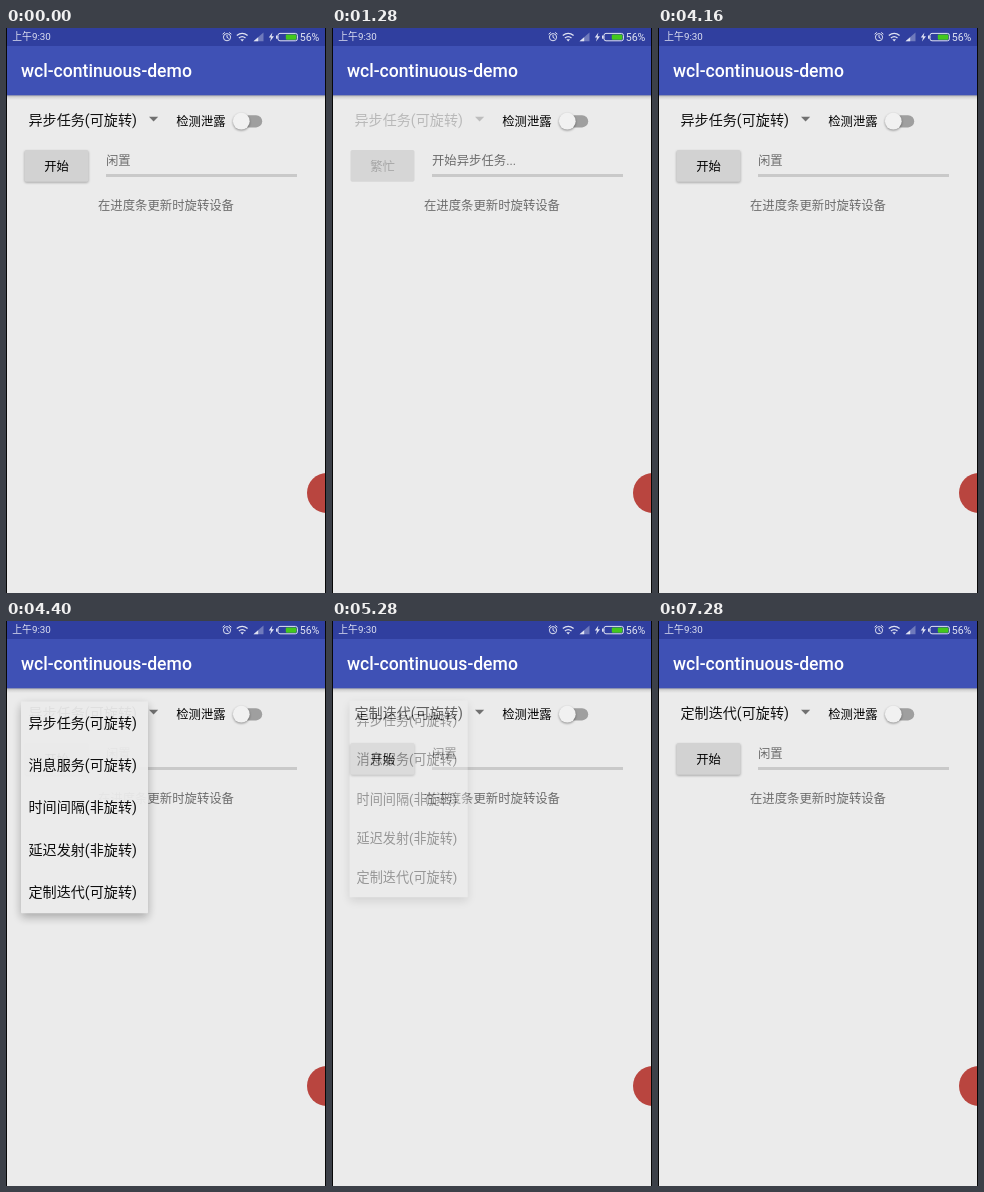
Animation, 320 px wide and 565 px high, one loop 7680 ms. Source, as an HTML page:

```html
<!DOCTYPE html>
<html lang="zh-CN">
<head>
<meta charset="utf-8">
<title>Task demo</title>
<style>
  html, body { margin: 0; width: 100%; height: 100%; overflow: hidden; background: #ebebeb; }
  svg { display: block; width: 320px; height: 565px; }
  text {
    font: 12.37px Roboto, "Noto Sans CJK SC", "Noto Sans CJK", "Noto Sans CJK JP", sans-serif;
    fill: #000;
    white-space: pre;
  }
  .big { font-size: 14.1px; }
  .title { font-size: 17.6px; font-weight: 500; fill: #fff; }
  .clock { font-size: 9.8px; fill: #dfe2f2; }
  .level { font-size: 10.6px; fill: #dfe2f2; }
  .soft { fill: #6c6c6c; }
  .mid { text-anchor: middle; }
  .line { fill: none; stroke: #dfe2f2; }
  #spinner { fill: #111; }
  #arrow { fill: #707070; }
  .busy #spinner { fill: #b9b9b9; }
  .busy #arrow { fill: #bdbdbd; }
  .busy #label { fill: #a6a6a6; }
  .busy #button { fill: #d6d6d6; filter: none; }
  #button { fill: #d2d2d2; filter: drop-shadow(0 1px 1px rgba(0, 0, 0, .3)); }
  #panel { fill: #ececec; filter: drop-shadow(0 4px 5px rgba(0, 0, 0, .3)); }
  #thumb { fill: #f1f1f1; filter: drop-shadow(0 1px 1px rgba(0, 0, 0, .4)); }
  #popup { transform-origin: 52px 66px; }
</style>
</head>
<body>
<svg id="stage" viewBox="0 0 320 565">
  <defs>
    <linearGradient id="shade" x2="0" y2="1">
      <stop stop-color="#000" stop-opacity=".3"/>
      <stop offset=".4" stop-color="#000" stop-opacity=".1"/>
      <stop offset="1" stop-color="#000" stop-opacity="0"/>
    </linearGradient>
    <clipPath id="buttonClip"><rect x="18.5" y="122" width="64" height="31.8" rx="1.8"/></clipPath>
    <clipPath id="rowClip"><rect x="15" y="250" width="127" height="42"/></clipPath>
  </defs>

  <rect width="320" height="565" fill="#ebebeb"/>
  <rect y="67" width="320" height="5" fill="url(#shade)"/>
  <rect y="18" width="320" height="49.3" fill="#3f51b5"/>
  <rect width="320" height="18" fill="#303f9f"/>
  <text class="title" x="15" y="49.3">wcl-continuous-demo</text>

  <!-- status bar -->
  <text class="clock" x="6.3" y="12.4">上午9:30</text>
  <g class="line">
    <circle cx="221" cy="9.2" r="3.6"/>
    <path d="M221 7v2.4l1.7 1M216.6 6.2l2.2-1.8M225.4 6.2l-2.2-1.8"/>
    <path stroke-width="1.3" d="M230.8 7.6q5.4-4.6 10.8 0M232.9 10q3.3-2.8 6.6 0"/>
  </g>
  <path d="M234.3 11.2h3.8l-1.9 2.3z" fill="#dfe2f2"/>
  <path d="M257.5 4.5v8.8h-10z" fill="#6f7abc"/>
  <path d="M252.2 9.2v4.1h-4.7z" fill="#dfe2f2"/>
  <path d="M266.4 4.6l-3.6 5h2.2l-1 3.8 4-5.2h-2.4z" fill="#dfe2f2"/>
  <rect class="line" x="272" y="5.4" width="19.4" height="7.4" rx="2"/>
  <rect x="270" y="7.5" width="1.6" height="3.2" fill="#dfe2f2"/>
  <rect x="279.8" y="6.4" width="10.6" height="5.4" rx="1" fill="#43c81c"/>
  <text class="level" x="293.7" y="12.8">56%</text>

  <!-- page -->
  <text id="spinner" class="big" x="22.5" y="96.7"></text>
  <path id="arrow" d="M143 88.8h9.2l-4.6 4.8z"/>
  <text x="170.2" y="98">检测泄露</text>
  <rect x="233" y="87.2" width="23.2" height="12.2" rx="6.1" fill="#9f9f9f"/>
  <circle id="thumb" cx="235.3" cy="93.2" r="8.4"/>

  <rect id="button" x="18.5" y="122" width="64" height="31.8" rx="1.8"/>
  <circle id="ripple" cx="50" cy="138" clip-path="url(#buttonClip)"/>
  <text id="label" class="mid" x="50.5" y="142.6"></text>
  <text id="state" class="soft" x="100" y="136.7"></text>
  <rect x="100" y="146" width="191" height="3" fill="#c9c9c9"/>
  <rect id="bar" x="100" y="146" height="3" fill="#ff4081"/>
  <text class="soft" x="92" y="182.2">在进度条更新时旋转设备</text>

  <circle cx="321" cy="465" r="20" fill="#b9453f"/>

  <g id="popup">
    <rect id="panel" x="15" y="80.5" width="127" height="211.7" rx="1"/>
    <circle id="touch" cx="78" cy="271" clip-path="url(#rowClip)"/>
  </g>

  <path d="M.5 0v565M319.5 0v565" stroke="#080808"/>
</svg>
<script>
  const LOOP = 7680, STEP = 80;
  const FIRST = '异步任务(可旋转)', LAST = '定制迭代(可旋转)';
  const $ = id => document.getElementById(id);

  [FIRST, '消息服务(可旋转)', '时间间隔(非旋转)', '延迟发射(非旋转)', LAST].forEach((name, i) => {
    const row = document.createElementNS('http://www.w3.org/2000/svg', 'text');
    row.setAttribute('class', 'big');
    row.setAttribute('x', 22.5);
    row.setAttribute('y', 106.7 + i * 42.3);
    row.textContent = name;
    $('popup').append(row);
  });

  // Times of press, 60 %, 80 % and the return to idle
  const runs = [
    { press: 800, at60: 1760, at80: 2160, end: 2560, intro: '开始异步任务...' },
    { press: 5600, at60: 6560, at80: 6880, end: 7280, intro: '开始自定义任务...' }
  ];

  function setText(id, value) {
    if ($(id).textContent !== value) $(id).textContent = value;
  }

  function percentOf(run, t) {
    if (t >= run.at80) return 80;
    if (t >= run.at60) return 60;
    if (t >= run.press + 640) return 40;
    return t >= run.press + 560 ? 20 : 0;
  }

  function wave(id, age, span, radius, alpha) {
    const on = age >= 0 && age < span;
    $(id).setAttribute('r', on ? radius * Math.min(1, (age + STEP) / 240) : 0);
    $(id).setAttribute('fill-opacity', alpha);
  }

  function popupPose(t) {
    if (t < 4320 || t >= 5440) return [0, 1];
    if (t < 4400) return [.5, .96];
    if (t < 4480) return [.94, 1];
    if (t < 5280) return [1, 1];
    return t < 5360 ? [.36, .93] : [.1, .9];
  }

  function draw(t) {
    const run = runs.find(r => t >= r.press && t < r.end);
    const busy = run && t >= run.press + 240;
    const percent = run ? percentOf(run, t) : 0;

    $('stage').classList.toggle('busy', !!busy);
    setText('spinner', t < 5280 ? FIRST : LAST);
    setText('label', busy ? '繁忙' : '开始');
    setText('state', !busy ? '闲置' : percent ? `进度${percent}%` : run.intro);
    $('bar').setAttribute('width', 191 * percent / 100);
    wave('ripple', run ? t - run.press : -1, 320, 36, .1);
    wave('touch', t - 5040, 240, 66, .08);

    const [alpha, scale] = popupPose(t);
    $('popup').style.opacity = alpha;
    $('popup').style.transform = `scale(${scale})`;
  }

  const start = performance.now();
  function tick() {
    const t = (performance.now() - start) % LOOP;
    draw(Math.floor(t / STEP) * STEP);
    requestAnimationFrame(tick);
  }
  tick();
</script>
</body>
</html>
```
